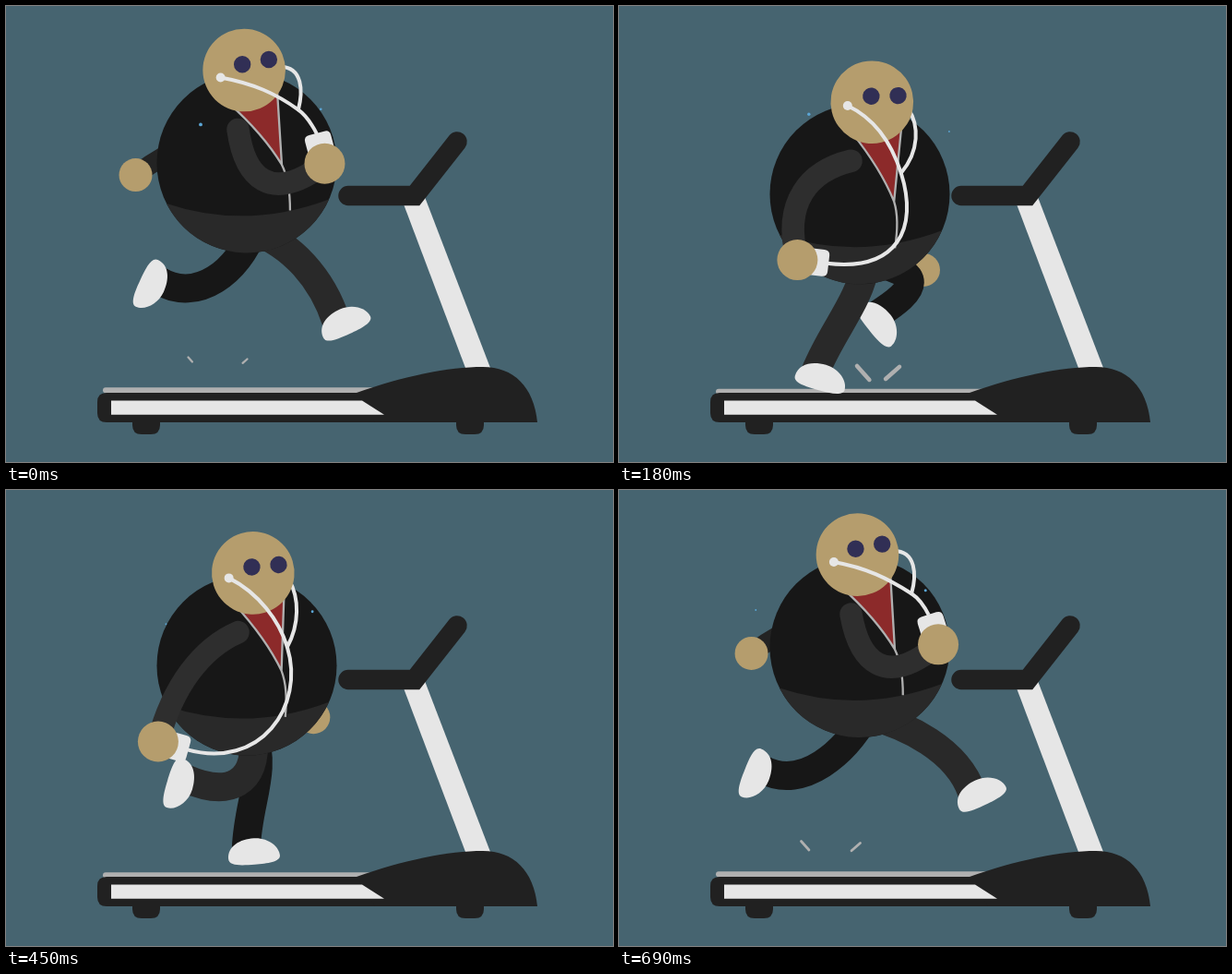
An HTML page with a canvas for the animation above (0.72 s loop, 658 by 494 pixels).

```html
<!DOCTYPE html>
<html lang="en">
<head>
<meta charset="utf-8">
<title>Treadmill runner</title>
<style>
html, body { margin: 0; width: 100%; height: 100%; overflow: hidden; background: #466470; }
canvas { display: block; }
</style>
</head>
<body>
<canvas id="stage" width="658" height="494"></canvas>
<script>
const ctx = document.getElementById('stage').getContext('2d');
const LOOP = 720, STEP = 30, RAD = Math.PI / 180;
const BODY_X = 261, BODY_R = 97.5;
const C = {
  sky: '#466470', skin: '#b59d6d', eye: '#312f55', coat: '#171717', pants: '#292929',
  sleeve: '#2e2e2e', farSleeve: '#232323', shirt: '#8c2a2a', gray: '#b0b0b0',
  white: '#e6e6e6', machine: '#212121', sweat: '#5ba6d6'
};

const wrap = t => ((t % LOOP) + LOOP) % LOOP;
const clamp = (v, lo, hi) => Math.min(hi, Math.max(lo, v));
const mix = (a, b, u) => a + (b - a) * u;
const wave = (t, peak, cycles = 1) => Math.cos(2 * Math.PI * cycles * (t - peak) / LOOP);
const pulse = (t, peak, power) => Math.max(0, wave(t, peak)) ** power;
const random = seed => { const s = Math.sin(seed * 91.7) * 4375.5; return s - Math.floor(s); };

// Moves by a distance in a direction given in degrees, clockwise from the right.
const polar = ([x, y], angle, dist) =>
  [x + dist * Math.cos(angle * RAD), y + dist * Math.sin(angle * RAD)];

function turn([x, y], angle) {
  const c = Math.cos(angle * RAD), s = Math.sin(angle * RAD);
  return [x * c - y * s, x * s + y * c];
}

const add = ([a, b], [x, y]) => [a + x, b + y];

function bezier(u, p0, p1, p2, p3) {
  const v = 1 - u;
  return p0.map((a, i) =>
    v * v * v * a + 3 * v * v * u * p1[i] + 3 * v * u * u * p2[i] + u * u * u * p3[i]);
}

function dot([x, y], r, color) {
  ctx.fillStyle = color;
  ctx.beginPath();
  ctx.arc(x, y, r, 0, 7);
  ctx.fill();
}

function fill(path, color) {
  ctx.fillStyle = color;
  ctx.fill(new Path2D(path));
}

function stroke(path, width, color, cap = 'round') {
  ctx.lineWidth = width;
  ctx.strokeStyle = color;
  ctx.lineCap = cap;
  ctx.lineJoin = 'miter';
  ctx.stroke(new Path2D(path));
}

function placed([x, y], angle, draw) {
  ctx.save();
  ctx.translate(x, y);
  ctx.rotate(angle * RAD);
  draw();
  ctx.restore();
}

// The foot rides the belt backwards, then swings forward. Returns x, y, angle.
function foot(time) {
  const start = -30, lift = 250;
  const t = wrap(time - start) + start;
  if (t < lift) {
    const u = (t - start) / (lift - start);
    return [367 - 0.82 * t, 202 - 0.00163 * (t - 135) ** 2, -25 + 73 * u * u];
  }
  const u = (t - lift) / (LOOP + start - lift);
  return bezier(u, [162, 181, 48], [89, 95, 197], [264, 137, 65], [391, 157.5, -25]);
}

function leg(t, cy, color) {
  const [x, y, angle] = foot(t);
  const sole = [x, cy + y], hip = [268, cy + 73];
  const thigh = 20 + 57 * wave(t, -61) + 22 * pulse(t, 590, 8);
  const knee = polar(hip, 90 - thigh, 45 + 32 * pulse(t, 525, 4));
  const ankle = add(sole, turn([-8, -4], angle));
  const shin = polar(ankle, angle - 84, 50);
  stroke(`M${hip}C${knee} ${shin} ${ankle}`, 31, color, 'butt');
  placed(sole, angle, () =>
    fill('M-28,6C-28,-8 -14,-14.5 1,-14.5C16,-14.5 28,-4 28,6C28,13 14,14 0,14C-14,14 -28,14 -28,6Z', C.white));
}

// Swing of the arm in degrees, positive to the front.
const armSwing = t => 75 * wave(t, 681) - 4 * wave(t, 681, 3);

function arm(t, cy, width, color, bow) {
  const swing = armSwing(t), dir = 90 - swing;
  const reach = 123 + 18 * wave(t, 400) + 9 * wave(t, 125, 2);
  const shoulder = [251.5, cy - 36], slack = 122 - reach;
  const bend = (along, out) => polar(polar(shoulder, dir, along * reach), dir + 90, out * bow);
  const hand = polar(shoulder, dir, reach);
  const upper = bend(0.25, 34 + slack / 2), lower = bend(0.61, 45 + slack * 0.9);
  stroke(`M${shoulder}C${upper} ${lower} ${hand}`, width, color);
  return hand;
}

function farArm(t, cy) {
  placed([14.5, 0], 0, () => {
    const hand = arm(t + LOOP / 2, cy, 21, C.farSleeve, 0.45);
    dot(hand, 18, C.skin);
  });
}

function torso(cy, tilt) {
  const center = [BODY_X, cy];
  dot(center, BODY_R, C.coat);
  placed(center, 0, () => {
    ctx.fillStyle = C.pants;
    ctx.beginPath();
    ctx.arc(0, 0, BODY_R, 23.9 * RAD, 153.2 * RAD);
    ctx.quadraticCurveTo(0, 73, 89, 39.5);
    ctx.fill();
  });
  placed(center, tilt, () => {
    fill('M-20,-65Q18,-31 38,2L33,-76Z', C.shirt);
    stroke('M-20,-65Q18,-31 38,2Q47,20 47,51.5M33,-76L38,2', 2.3, C.gray, 'butt');
  });
}

function head(cy, tilt) {
  placed([BODY_X, cy], tilt, () => {
    dot([-3, -100.4], 44.8, C.skin);
    dot([-5, -106.7], 9.2, C.eye);
    dot([23.7, -112], 9.2, C.eye);
  });
}

// Cord shape follows the arm: taut when it is in front, a long loop when behind.
function cordShape(t, cy, tilt) {
  const loose = (1 - armSwing(t) / 70) / 2;
  const onBody = p => add([BODY_X, cy], turn(p, tilt));
  const joint = [BODY_X + 56 - 16 * loose, cy - 58 + 50 * loose];
  const pull = [12 + 10 * loose, 8 + 74 * loose];
  return { loose, joint, pull, bud: onBody([-28.5, -92.4]), skull: onBody([-3, -100.4]) };
}

function earCord({ loose, joint, skull }) {
  const ear = add(skull, [39, -4 + 15 * loose]);
  const side = 25 - 18 * loose;
  const top = add(ear, [side, 26 * loose]), low = add(ear, [side, 27 + 28 * loose]);
  stroke(`M${ear}C${top} ${low} ${joint}`, 4, C.white);
}

function mainCord({ loose, joint, pull, bud }, plug, phoneAngle) {
  const out = polar(bud, 10 + 22 * loose, 36);
  const heading = Math.atan2(pull[1], pull[0]) / RAD;
  const before = polar(joint, heading, -30);
  const sag = polar(plug, phoneAngle, 110 * loose);
  stroke(`M${bud}C${out} ${before} ${joint}C${add(joint, pull)} ${sag} ${plug}`, 4, C.white);
  dot(bud, 5, C.white);
}

function nearArm(t, cy, cord) {
  const hand = arm(t, cy, 24.5, C.sleeve, 1);
  const phoneAngle = -26 - 1.15 * armSwing(t);
  mainCord(cord, polar(hand, phoneAngle, 32), phoneAngle);
  placed(hand, phoneAngle, () =>
    fill('M0,-14.5H28Q34,-14.5 34,-8.5V8.5Q34,14.5 28,14.5H0Z', C.white));
  dot(hand, 22, C.skin);
}

function impact(t, shift, delay) {
  const s = wrap(t - delay);
  const lead = clamp((s - 100) / 120, 0, 1), tail = clamp((s - 153) / 190, 0, 1);
  if (lead <= tail) return;
  const line = (x0, y0, x1, y1) => {
    const at = u => `${mix(x0, x1, u) + shift},${mix(y0, y1, u)}`;
    stroke(`M${at(tail)}L${at(lead)}`, 5 - 3.3 * tail, C.gray);
  };
  line(275, 409, 249.5, 380.5);
  line(285, 407.5, 313.5, 382.5);
}

function sweat(t) {
  for (let i = 0; i < 8; i++) {
    const u = wrap(t - i * LOOP / 8) / 150;
    if (u > 1) continue;
    const side = i % 2 ? 1 : -1;
    const x = BODY_X + side * (50 + 25 * random(i) + 45 * u);
    const y = 110 + 40 * random(i + 20) - 30 * u + 45 * u * u;
    dot([x, y], (1.2 + random(i + 40)) * (1 - u / 2), C.sweat);
  }
}

function treadmill(press) {
  stroke(`M108,${416.2 + press}H400`, 6, C.gray);
  fill('M430,212L454,207L525,392H498Z', C.white);
  stroke('M371,205.5H443L489,147', 21.5, C.machine);
  for (const x of [137, 488]) fill(`M${x},448h30v6q0,10 -10,10h-10q-10,0 -10,-10Z`, C.machine);
  fill('M109,419H420V451H109Q99,451 99,441V429Q99,419 109,419Z', C.machine);
  fill('M380,419C430,401 480,391 517,391C550,391 572,412 576,451H400Z', C.machine);
  fill('M114,427.5H386L410,442.7H114Z', C.white);
}

function draw(t) {
  const bob = (1 - wave(t, -11, 2)) / 2;
  const cy = 169.6 + 34.5 * bob, tilt = 9.4 * bob;
  const cord = cordShape(t, cy, tilt);
  ctx.fillStyle = C.sky;
  ctx.fillRect(0, 0, 658, 494);

  farArm(t, cy);
  treadmill(1.6 * bob);
  leg(t + 390, cy, C.coat);
  leg(t, cy, C.pants);
  torso(cy, tilt);
  earCord(cord);
  head(cy, tilt);
  nearArm(t, cy, cord);
  impact(t, 0, 0);
  impact(t, -52, 410);
  sweat(t);
}

const start = performance.now();
function tick() {
  const t = wrap(performance.now() - start);
  draw(Math.floor(t / STEP) * STEP);
  requestAnimationFrame(tick);
}
tick();
</script>
</body>
</html>
```
